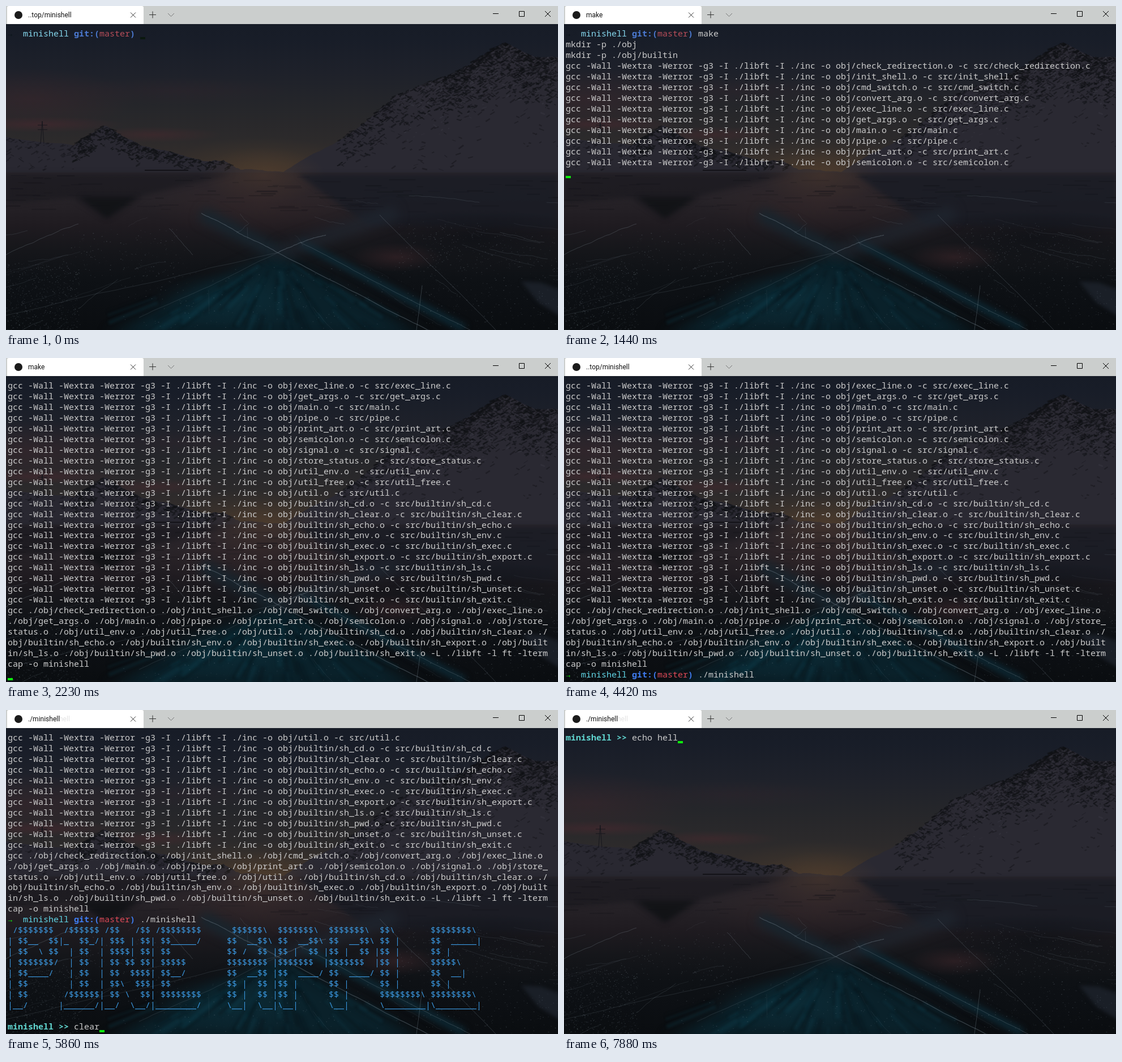
An HTML page with a canvas for the animation above (8000 ms loop, 975 by 574 pixels).

```html
<!DOCTYPE html>
<html lang="en">
<head>
<meta charset="utf-8">
<title>minishell</title>
<style>
html, body { margin: 0; width: 100%; height: 100%; overflow: hidden; background: #0b0d11; }
canvas, svg { position: absolute; left: 0; top: 0; display: block; }
text { white-space: pre; }
#rows text { font: 15px "Noto Sans Mono", "DejaVu Sans Mono", monospace; fill: #ccc; }
.bar { font: 12px Roboto, Arial, sans-serif; fill: #111; }
#ghost { fill: #e2e2e2; }
#rows .arrow { fill: #16e010; font-weight: 600; }
#rows .dir { fill: #61d6e6; }
#rows .git { fill: #3f7cf0; font-weight: 600; }
#rows .branch { fill: #e04a58; }
#rows .shell { fill: #61d6d0; font-weight: 600; }
#rows .art { fill: #3a96dd; }
#cursor { fill: #0cf00c; }
#rows.early .arrow { fill: #0c151b; }
#rows.early .dir { fill: #86d8ee; }
#rows.early .git { fill: #4c7ad2; }
#rows.early .branch { fill: #b84e5a; }
</style>
</head>
<body>
<canvas id="photo" width="975" height="574"></canvas>
<svg width="975" height="574" viewBox="0 0 975 574">
  <rect width="975" height="32" fill="#cbcecd"/>
  <path d="M2 32V3q0-3 3-3H240q3 0 3 3V32z" fill="#fff"/>
  <circle cx="22" cy="16" r="7" fill="#1b1b1b"/>
  <text id="ghost" class="bar" x="94" y="20">hell</text>
  <text id="title" class="bar" x="39" y="20"></text>
  <g fill="none" stroke="#333">
    <path d="M220 11.5l9 9m0-9l-9 9"/>
    <path d="M253 15.5h12m-6-6v12"/>
    <path d="M286 13l5.5 5.5L297 13" stroke="#777"/>
    <path d="M860 13.5h10M906.5 9.5h9v9h-9zM952 9l10 10m0-10l-10 10" stroke="#000"/>
  </g>
  <g id="rows"></g>
  <rect id="cursor" width="9" height="4"/>
</svg>
<script>
const $ = id => document.getElementById(id);

// ---------- terminal text ----------
const ROWS = 28, COLS = 106, CELL = 9, PITCH = 512 / 27, LOOP = 8000;
const span = (cls, s) => `<tspan class="${cls}">${s}</tspan>`;
const prompts = {
  none: '',
  git: span('arrow', '→') + '  ' + span('dir', 'minishell') + ' ' + span('git', 'git:(') +
    span('branch', 'master') + span('git', ')') + ' ',
  shell: span('shell', 'minishell &gt;&gt;') + ' '
};
const promptCols = { none: 0, git: 26, shell: 13 };

const core = 'check_redirection init_shell cmd_switch convert_arg exec_line get_args main pipe ' +
  'print_art semicolon signal store_status util_env util_free util';
const builtins = 'cd clear echo env exec export ls pwd unset exit';
const files = [...core.split(' '), ...builtins.split(' ').map(b => 'builtin/sh_' + b)];
const link = 'gcc ' + files.map(f => `./obj/${f}.o `).join('') + '-L ./libft -l ft -ltermcap -o minishell';

const art = String.raw`
 /$$$$$$$  /$$$$$$ /$$   /$$ /$$$$$$$$      $$$$$$\  $$$$$$$\  $$$$$$$\  $$\       $$$$$$$$\
| $$__  $$|_  $$_/| $$$ | $$| $$_____/     $$  __$$\ $$  __$$\ $$  __$$\ $$ |      $$  _____|
| $$  \ $$  | $$  | $$$$| $$| $$           $$ /  $$ |$$ |  $$ |$$ |  $$ |$$ |      $$ |
| $$$$$$$/  | $$  | $$ $$ $$| $$$$$        $$$$$$$$ |$$$$$$$  |$$$$$$$  |$$ |      $$$$$\
| $$____/   | $$  | $$  $$$$| $$__/        $$  __$$ |$$  ____/ $$  ____/ $$ |      $$  __|
| $$        | $$  | $$\  $$$| $$           $$ |  $$ |$$ |      $$ |      $$ |      $$ |
| $$       /$$$$$$| $$ \  $$| $$$$$$$$     $$ |  $$ |$$ |      $$ |      $$$$$$$$\ $$$$$$$$\
|__/      |______/|__/  \__/|________/     \__|  \__|\__|      \__|      \________|\________|`;

const setup = [prompts.git + 'make', 'mkdir -p ./obj', 'mkdir -p ./obj/builtin',
  ...files.map(f => `gcc -Wall -Wextra -Werror -g3 -I ./libft -I ./inc -o obj/${f}.o -c src/${f}.c`)];
const built = [...setup, ...link.match(new RegExp(`.{1,${COLS}}`, 'g'))];
const started = [...built, prompts.git + './minishell', ...art.split('\n').slice(1).map(s => span('art', s)), ''];

// ---------- session: each step changes part of the state before it ----------
const steps = [{ time: 0, log: [], prompt: 'git', typed: '', title: '..top/minishell', cursor: '#0b180f' }];
const set = (time, change) => steps.push({ ...steps.at(-1), cursor: '', time, ...change });
const blink = time => set(time, { cursor: 'none' });
function type(time, gap, text, from = 1, by = 1) {
  for (let n = from; n <= text.length; n += by, time += gap) set(time, { typed: text.slice(0, n) });
}

type(480, 160, 'make');
for (let k = 0; k < 7; k++) {
  set(1120 + 160 * k, { log: setup.slice(0, 5 + 4 * k), prompt: 'none', typed: '', title: 'make' });
}
steps.at(-1).cursor = 'none';
set(2230, { log: built });
set(2400, { prompt: 'git', title: '..top/minishell' });
blink(2860);
type(3490, 150, './');
set(3960, { typed: './minishell' });
blink(4420);
set(4590, { log: started, prompt: 'shell', typed: '', title: './minishell' });
blink(5220);
type(5540, 160, 'clear', 1, 2);
set(6160, { log: [], typed: '' });
set(6330, { typed: 'e' });
type(6650, 150, 'echo ', 3, 2);
type(7410, 156, 'echo hell', 6);

const rows = Array.from({ length: ROWS }, (_, i) => {
  const t = document.createElementNS('http://www.w3.org/2000/svg', 'text');
  t.setAttribute('x', 3);
  t.setAttribute('y', Math.round(54 + i * PITCH));
  return $('rows').appendChild(t);
});

function show({ time, log, prompt, typed, title, cursor }) {
  const screen = [...log, prompts[prompt] + typed].slice(-ROWS);
  rows.forEach((row, i) => row.innerHTML = screen[i] || '');
  $('rows').setAttribute('class', time < 2080 ? 'early' : '');
  $('cursor').setAttribute('x', 3 + CELL * (promptCols[prompt] + typed.length));
  $('cursor').setAttribute('y', Math.floor(55.01 + (screen.length - 1) * PITCH));
  $('cursor').style.fill = cursor;
  $('title').textContent = title;
  $('ghost').style.visibility = title === './minishell' ? 'visible' : 'hidden';
}

let shown;
function tick() {
  const now = performance.now() % LOOP;
  const step = steps.findLast(s => s.time <= now);
  if (step !== shown) show(shown = step);
  requestAnimationFrame(tick);
}

// ---------- wallpaper ----------
const g = $('photo').getContext('2d');
const HORIZON = 295;
let seed = 7;
const rnd = (a = 0, b = 1) => {
  seed = (seed * 16807) % 2147483647;
  return a + (b - a) * seed / 2147483647;
};
const times = (n, f) => { for (let i = 0; i < n; i++) f(); };

function trace(points, blur) {
  g.filter = blur ? `blur(${blur}px)` : 'none';
  g.beginPath();
  points.forEach(p => g.lineTo(...p));
}
function fill(points, color, blur) {
  trace(points, blur);
  g.fillStyle = color;
  g.fill();
  g.filter = 'none';
}
function line(points, color, width = 1, blur) {
  trace(points, blur);
  g.strokeStyle = color;
  g.lineWidth = width;
  g.stroke();
  g.filter = 'none';
}
function glow(x, y, rx, ry, rgb, alpha) {
  g.save();
  g.translate(x, y);
  g.scale(rx, ry);
  const r = g.createRadialGradient(0, 0, 0, 0, 0, 1);
  r.addColorStop(0, `rgba(${rgb},${alpha})`);
  r.addColorStop(1, `rgba(${rgb},0)`);
  g.fillStyle = r;
  g.fillRect(-1, -1, 2, 2);
  g.restore();
}
function band(y0, y1, colors) {
  const v = g.createLinearGradient(0, y0, 0, y1);
  colors.forEach((c, i) => v.addColorStop(i / (colors.length - 1), c));
  g.fillStyle = v;
  g.fillRect(0, y0, 975, y1 - y0);
}
// midpoint displacement between a few peaks
function rough(points, amp) {
  if (amp < 0.3) return points;
  const out = points.flatMap((p, i) => {
    const q = points[i + 1];
    return q ? [p, [(p[0] + q[0]) / 2, (p[1] + q[1]) / 2 + rnd(-amp, amp)]] : [p];
  });
  return rough(out, amp * 0.6);
}
// short strokes running down a slope, densest near its ridge
function rocks(ridge, n, depth, x0, x1, alpha, rgb = '17,18,22') {
  times(n, () => {
    const x = rnd(x0, x1);
    const top = ridge.find(p => p[0] >= x)[1];
    const y = top + depth * rnd() ** 1.7, len = rnd(2, 9), dir = rnd() < 0.65 ? -1 : 1;
    if (y < HORIZON - 6) {
      line([[x, y], [x + dir * len, y + len * rnd(0.2, 0.8)]], `rgba(${rgb},${alpha})`, rnd(0.8, 2.8));
    }
  });
}
function frost(n, x0, x1, y0, y1) {
  times(n, () => {
    g.fillStyle = `rgba(140,152,162,${rnd(0.05, 0.34)})`;
    g.fillRect(rnd(x0, x1), rnd(y0, y1), rnd(0.7, 2), 1);
  });
}
function crack(a, b, alpha, width = 1) {
  line(rough([a, b], 3), `rgba(125,140,150,${alpha})`, width);
}

function sky() {
  band(0, HORIZON, ['#161b25', '#181d28', '#1e212a', '#25262a', '#2c2a2b', '#372f2b']);
  glow(450, 292, 170, 60, '84,66,44', 0.4);
  glow(40, 165, 190, 55, '66,38,44', 0.4);
  glow(300, 150, 200, 24, '52,36,44', 0.3);
  glow(60, 210, 150, 14, '84,40,48', 0.4);
  glow(260, 228, 120, 14, '80,40,46', 0.4);
}

function mountains() {
  const right = rough([[490, 294], [595, 235], [690, 158], [800, 115], [882, 65], [935, 90], [975, 91]], 3);
  const left = rough([[0, 232], [120, 247], [175, 212], [238, 247], [350, 275], [385, 273], [414, 290], [491, 294]], 2.5);
  fill([...right, [975, HORIZON], [490, HORIZON]], '#2a2932');
  rocks(right, 650, 60, 590, 975, 0.6);
  rocks(right, 700, 85, 770, 975, 0.6);
  rocks(right, 250, 170, 600, 975, 0.45);
  rocks(right, 150, 100, 700, 975, 0.4, '60,59,69');
  fill([...left, [491, HORIZON], [0, HORIZON]], '#292831');
  rocks(left, 260, 34, 122, 238, 0.65);
  rocks(left, 200, 20, 240, 412, 0.65);
  rocks(left, 80, 50, 0, 120, 0.4);
  line([[245, 291], [322, 291]], '#131318', 2);
  [61, 67].forEach(x => line([[64, 204], [x, 244]], '#17171d'));
  [211, 219].forEach(y => line([[56, y], [73, y]], '#17171d'));
}

function water() {
  band(HORIZON, 574, ['#29252b', '#272328', '#1f1b20', '#15161a', '#0e1115', '#0c0f13', '#0a0d10']);
  glow(455, 300, 110, 50, '88,64,46', 0.45);
  glow(450, 350, 200, 60, '60,42,42', 0.45);
  fill([[0, 297], [400, 297], [245, 335], [178, 378], [118, 340], [0, 350]], 'rgba(23,23,29,0.55)', 5);
  fill([[130, 338], [232, 338], [178, 376]], 'rgba(13,15,18,0.6)', 4);
  fill([[515, 298], [975, 298], [975, 395], [640, 388], [580, 345]], 'rgba(26,28,37,0.8)', 4);
  glow(830, 410, 210, 50, '13,16,21', 0.7);
  times(90, () => {
    const x = rnd(-30, 975), y = rnd(299, 365);
    line([[x, y], [x + rnd(10, 50), y]], `rgba(14,15,20,${rnd(0.1, 0.35)})`, rnd(1, 2.5));
  });
}

function ice() {
  const hub = [480, 437], side = [520, 419];
  glow(690, 445, 80, 26, '66,40,44', 0.5);
  fill([hub, [735, 585], [180, 585], [330, 505]], '#0a212a', 12);
  glow(400, 520, 150, 50, '14,58,72', 0.4);
  // teal streaks fanning out below the hub
  times(70, () => {
    const a = rnd(0.55, 2.7), r = rnd(20, 170);
    const at = d => [hub[0] + d * Math.cos(a) * 1.5, hub[1] + d * Math.sin(a)];
    line([at(r), at(r + rnd(20, 80))], `rgba(${rnd() < 0.5 ? '16,62,76' : '8,16,21'},0.28)`, rnd(3, 9), 2);
  });
  line([side, [810, 572]], '#0d2732', 14, 6);
  line([[345, 368], hub], '#18252e', 24, 9);
  line([hub, [690, 365]], 'rgba(34,42,52,0.6)', 26, 10);
  fill([[910, 488], [945, 490], [980, 503], [980, 550], [940, 525]], '#1a1f27', 3);

  [[345, 367], [745, 574], [565, 406]].forEach(end => crack(hub, end, 0.36, 1.3));
  [[0, 548], [235, 552]].forEach(end => crack(hub, end, 0.2));
  crack(side, [820, 574], 0.3);
  crack([660, 370], [865, 574], 0.3);
  crack([735, 495], [725, 574], 0.35);
  crack([0, 441], [128, 386], 0.3);
  crack([288, 394], [330, 441], 0.3);
  // faint lines following the perspective from the horizon
  times(40, () => {
    const x = rnd(0, 975), y = rnd(320, 560), k = rnd(0.1, 0.45);
    crack([x, y], [x + (x - 455) * k + rnd(-40, 40), y + (y - HORIZON) * k * 0.7], rnd(0.06, 0.22));
  });

  frost(650, 0, 130, 455, 574);
  frost(160, 100, 320, 395, 480);
  frost(420, 740, 975, 400, 574);
  frost(170, 690, 850, 380, 470);
  frost(250, 200, 740, 460, 574);
}

sky();
mountains();
water();
ice();
tick();
</script>
</body>
</html>
```
